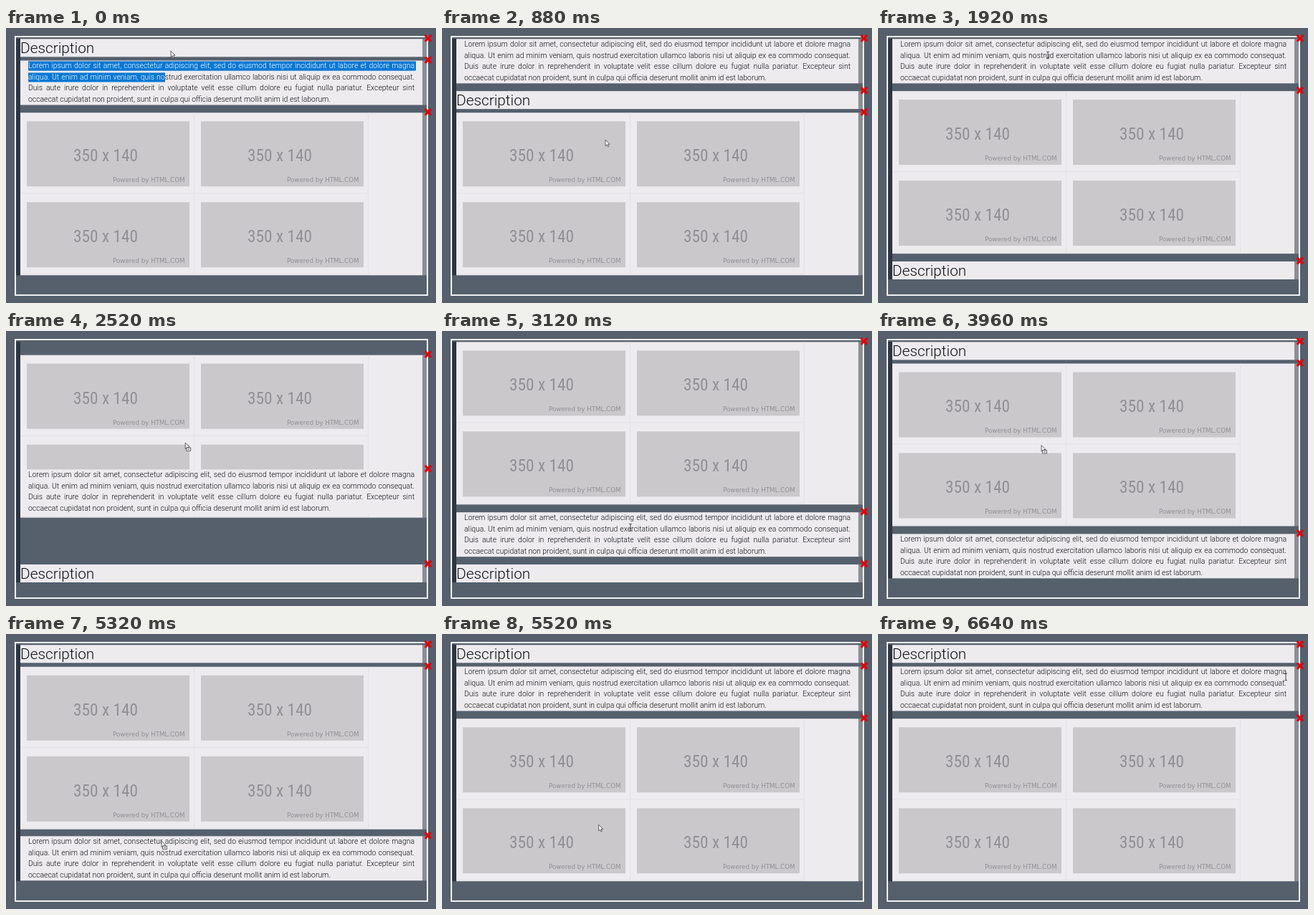
These frames come from a looping animation (600 px wide and 384 px high, 6.68 s). An HTML page:

```html
<!DOCTYPE html>
<html lang="en">
<head>
<meta charset="utf-8">
<title>Sortable blocks</title>
<style>
html, body { margin: 0; width: 100%; height: 100%; overflow: hidden; background: #56606d; }
#stage { position: relative; width: 600px; height: 384px; overflow: hidden; color: #0e1115; font: 300 10.4px/15.6px Roboto, sans-serif; }
#stage div, #stage svg { position: absolute; }
.frame { left: 12px; top: 11px; width: 573px; height: 359px; border: 2px solid #f1f1f4; }
.rail { left: 14px; top: 15px; width: 6px; height: 330px; background: #2e3642; }
.block { left: 20px; top: 0; width: 561px; background: #edebee; }
.block::before, .block::after { content: ""; position: absolute; top: 0; bottom: 0; width: 6px; }
.block::before { left: -6px; background: #2e3642; }
.block::after { right: -6px; background: #8b8f97; }
.close { left: 561.5px; top: -8.5px; width: 14px; height: 14px; z-index: 1; }
#D { height: 25.3px; font-size: 20.8px; line-height: 26px; }
#T { height: 62.4px; }
#T div { left: 11px; width: 539px; white-space: nowrap; text-align-last: justify; }
#T div:nth-of-type(4) { text-align-last: left; }
.picked .sel { color: #fff; background: #0878d4; }
.picked div:nth-of-type(1) .sel { box-shadow: 2px 0 #0878d4; }
#G { height: 227.2px; }
.cell { width: 243px; height: 113px; border: solid #e4e2e8; border-width: 0 1px 1px 0; box-sizing: border-box; }
.pic { left: 8.5px; top: 12.3px; width: 227px; height: 91px; background: #cac8cb; color: #929094; }
.size { left: 0; width: 221px; top: 33.4px; text-align: center; white-space: nowrap; font: condensed 23.3px/28px "Liberation Sans Narrow", "Roboto Condensed", Roboto, sans-serif; }
.by { right: 6px; bottom: 2.5px; white-space: nowrap; font: 8.7px/13px "DejaVu Sans", sans-serif; }
#cursor { left: 0; top: 0; width: 14px; height: 18px; overflow: visible; z-index: 2; }
</style>
</head>
<body>
<div id="stage">
  <div class="frame"></div>
  <div class="rail"></div>
  <div class="block" id="G"></div>
  <div class="block" id="T">
    <div><span class="sel">Lorem ipsum dolor sit amet, consectetur adipiscing elit, sed do eiusmod tempor incididunt ut labore et dolore magna</span></div>
    <div style="top:15.6px"><span class="sel">aliqua. Ut enim ad minim veniam, quis no</span>strud exercitation ullamco laboris nisi ut aliquip ex ea commodo consequat.</div>
    <div style="top:31.2px">Duis aute irure dolor in reprehenderit in voluptate velit esse cillum dolore eu fugiat nulla pariatur. Excepteur sint</div>
    <div style="top:46.8px">occaecat cupidatat non proident, sunt in culpa qui officia deserunt mollit anim id est laborum.</div>
  </div>
  <div class="block" id="D">Description</div>
  <svg id="cursor">
    <g id="arrow" fill="#f4f4f4" stroke="#444" stroke-width=".8">
      <path d="M0 0V8.6L2 6.8L3.4 9.8L4.8 9.1L3.5 6.2H6Z"/>
      <path id="badge" d="M1.5 7H7.5V11.5H1.5ZM3 9.2H6"/>
    </g>
    <path id="beam" d="M-2-5Q0-5 0-4Q0-5 2-5M0-4V4M-2 5Q0 5 0 4Q0 5 2 5" fill="none" stroke="#333" stroke-width=".9"/>
  </svg>
</div>
<script>
const $ = id => document.getElementById(id);
const LOOP = 6680, SLIDE = 180, TOP = 15.3;
const PITCH = { D: 30.16, T: 72.8, G: 237.9 };
const ARROW = 0, DRAG = 1, BEAM = 2;

// [time, block order from top to bottom]
const orders = [[-SLIDE, "DTG"], [340, "TDG"], [1360, "TGD"], [2400, "GTD"], [3580, "GDT"], [3760, "DGT"], [5314, "DTG"]];

// [time, x, y, cursor kind until the next entry]
const path = [
  [0, 230, 32, ARROW], [140, 230, 32, DRAG], [340, 229, 52, DRAG], [720, 228, 118, ARROW],
  [880, 228, 156, ARROW], [1000, 228, 160, ARROW], [1120, 228, 158, DRAG], [1360, 230, 105, DRAG],
  [1600, 234, 45, BEAM], [1920, 237, 38, BEAM], [2080, 237, 38, DRAG], [2400, 245, 110, DRAG],
  [2800, 262, 262, BEAM], [3120, 263, 274, BEAM], [3240, 256, 300, ARROW], [3440, 240, 338, ARROW],
  [3560, 240, 338, DRAG], [3960, 228, 160, DRAG], [4160, 232, 60, ARROW], [4240, 234, 40, ARROW],
  [4560, 85, 90, ARROW], [4760, 85, 90, DRAG], [5320, 217, 289, DRAG], [5440, 218, 296, ARROW],
  [6000, 222, 90, BEAM], [6120, 222, 70, BEAM], [6640, 569, 60, BEAM], [LOOP, 569, 60, BEAM]
];

const close = '<svg class="close" viewBox="-7 -7 14 14"><path d="M-4.3-4.3L4.3 4.3M4.3-4.3L-4.3 4.3" stroke="#e20009" stroke-width="3.2"/></svg>';
for (let i = 0; i < 4; i++)
  $("G").innerHTML += `<div class="cell" style="left:${i % 2 * 243}px;top:${(i >> 1) * 113}px"><div class="pic"><div class="size">350 x 140</div><div class="by">Powered by HTML.COM</div></div></div>`;
for (const id in PITCH) $(id).insertAdjacentHTML("beforeend", close);

const ease = u => u * u * (3 - 2 * u);
const mix = (a, b, u) => a + (b - a) * u;
const lastIndex = (list, t) => list.findLastIndex(k => k[0] <= t);

function topOf(id, order) {
  let y = TOP;
  for (const other of order) {
    if (other === id) return y;
    y += PITCH[other];
  }
}

function draw(t) {
  const n = lastIndex(orders, t);
  const [start, order] = orders[n];
  const before = orders[Math.max(n - 1, 0)][1];
  const u = ease(Math.min((t - start) / SLIDE, 1));
  for (const id in PITCH)
    $(id).style.transform = `translateY(${mix(topOf(id, before), topOf(id, order), u)}px)`;
  $("T").classList.toggle("picked", t < 160);

  const k = Math.min(lastIndex(path, t), path.length - 2);
  const [t0, x0, y0, kind] = path[k], [t1, x1, y1] = path[k + 1];
  const v = (t - t0) / (t1 - t0);
  $("cursor").style.transform = `translate(${mix(x0, x1, v)}px,${mix(y0, y1, v)}px)`;
  $("arrow").style.display = kind === BEAM ? "none" : "";
  $("badge").style.display = kind === DRAG ? "" : "none";
  $("beam").style.display = kind === BEAM ? "" : "none";
}

const begin = performance.now();
function tick() {
  draw((performance.now() - begin) % LOOP);
  requestAnimationFrame(tick);
}
tick();
</script>
</body>
</html>
```
